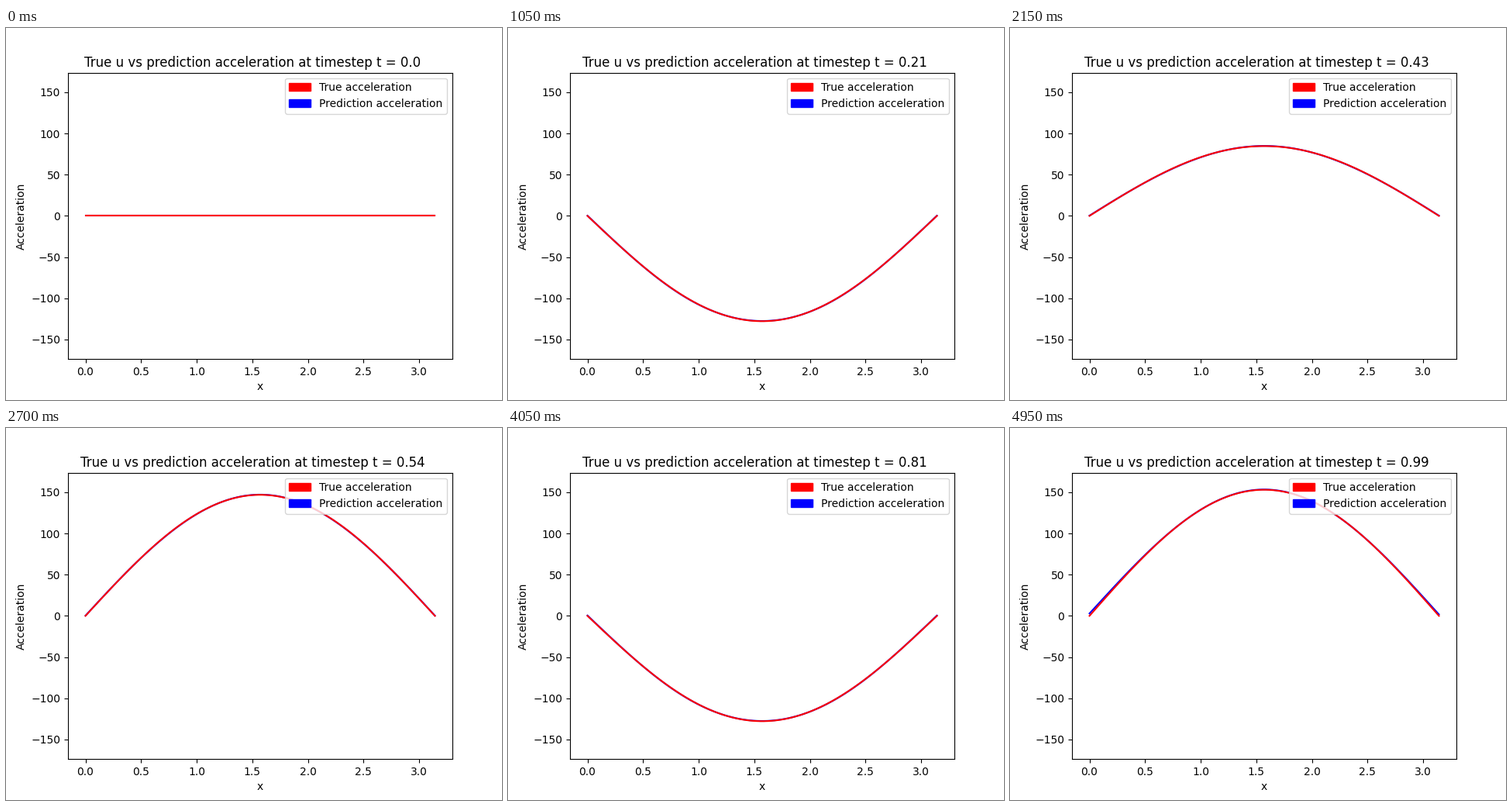
A matplotlib script for the animation above (5000 ms loop, 640x480 px).

```python
import numpy as np
import matplotlib.pyplot as plt
from matplotlib.animation import FuncAnimation
from matplotlib.patches import Patch

FRAMES = 100
OMEGA = 4 * np.pi
PEAK = OMEGA ** 2

x = np.linspace(0, np.pi, 100)


def true_acceleration(n):
    """The beam is at rest on the first step, then swings harmonically."""
    if n == 0:
        return np.zeros_like(x)
    return PEAK * np.cos(OMEGA * (n - 1) / FRAMES) * np.sin(x)


def prediction_error(n):
    """Small ripple, plus a drift near both ends late in the run."""
    if n == 0:
        return np.zeros_like(x)
    drift = 3.0 * np.exp(-x / 0.4) + 1.7 * np.exp((x - np.pi) / 0.4)
    return 0.25 * np.cos(4 * x) + drift * (n / FRAMES) ** 12


fig, ax = plt.subplots(figsize=(6.4, 4.8), dpi=100)
ax.set_xlim(-0.05 * np.pi, 1.05 * np.pi)
ax.set_ylim(-1.1 * PEAK, 1.1 * PEAK)
ax.set_xlabel("x")
ax.set_ylabel("Acceleration")

predicted, = ax.plot(x, np.zeros_like(x), color="blue")
true, = ax.plot(x, np.zeros_like(x), color="red")
title = ax.text(0.48, 1.02, "", size=12, ha="center", transform=ax.transAxes)
ax.legend(
    handles=[
        Patch(color="red", label="True acceleration"),
        Patch(color="blue", label="Prediction acceleration"),
    ],
    loc="upper right",
)


def update(n):
    y = true_acceleration(n)
    true.set_ydata(y)
    predicted.set_ydata(y + prediction_error(n))
    title.set_text(f"True u vs prediction acceleration at timestep t = {n / FRAMES}")
    return predicted, true, title


anim = FuncAnimation(fig, update, frames=FRAMES, interval=50, repeat=True, repeat_delay=0)
plt.show()
```
